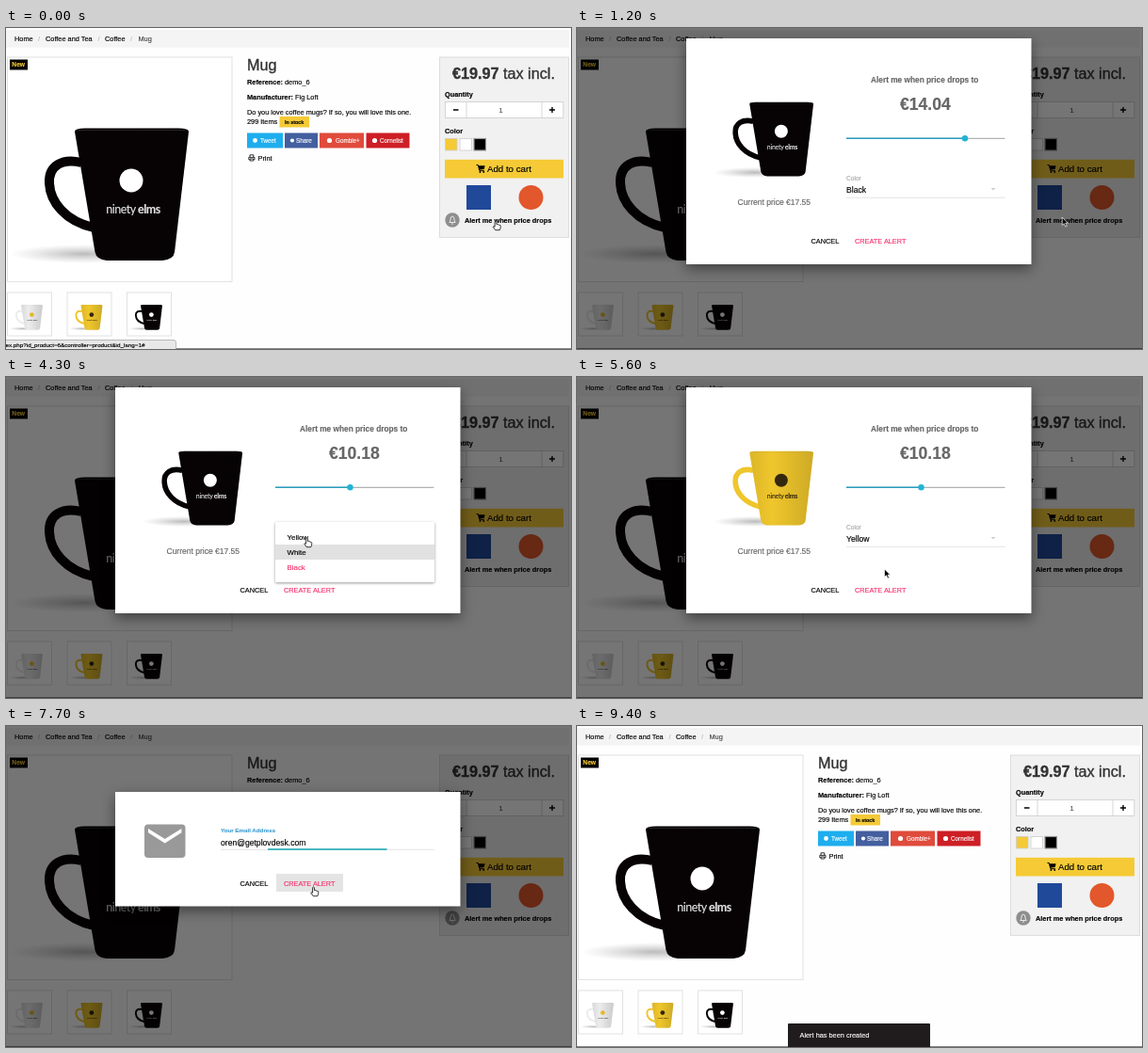
An HTML page for the animation above (9500 ms loop, 600 by 341 pixels).

```html
<!DOCTYPE html>
<html lang="en">
<head>
<meta charset="utf-8">
<title>Price alert</title>
<style>
  html, body { margin: 0; width: 100%; height: 100%; overflow: hidden; background: #fff; }
  svg { display: block; width: 100vw; height: 100vh; }
  text {
    font: 7.35px "Liberation Sans", Arial, sans-serif; white-space: pre;
    fill: currentColor; stroke: currentColor; stroke-width: .15;
  }
  .b { font-weight: bold; }
  .h { font-size: 16.2px; color: #333; stroke-width: .35; }
  .share text { font-size: 6.3px; color: #fff; }
  .share rect { y: 111.5px; height: 16px; }
  .share circle { fill: #fff; }
  .frame { fill: #fff; stroke: #e2e2e2; }
  .field { fill: #fff; stroke: #ccc; stroke-width: .8; }
  .big { font-size: 8.6px; }
  .grey { color: #666; }
  .pink { color: #f7316f; }
  .item { font-size: 7.9px; }
  .brand { font: 12.5px Lato, sans-serif; letter-spacing: -.5px; text-anchor: middle; color: var(--ink); }
  .black { --cup: #070304; --mark: #fff; --ink: #e4e4e4; }
  .yellow { --cup: #efc62c; --mark: #33270f; --ink: #33270f; }
  .white { --cup: #ececec; --mark: #e3b92a; --ink: #444; }
  .paper { fill: #fff; filter: drop-shadow(0 5px 7px rgba(0,0,0,.45)); }
</style>
</head>
<body>
<svg viewBox="0 0 600 341">
  <defs>
    <radialGradient id="ground">
      <stop offset="0" stop-color="#777" stop-opacity=".5"/>
      <stop offset="1" stop-color="#999" stop-opacity="0"/>
    </radialGradient>
    <linearGradient id="shade">
      <stop offset="0" stop-opacity=".08"/>
      <stop offset=".35" stop-opacity="0"/>
      <stop offset="1" stop-opacity=".14"/>
    </linearGradient>
    <path id="cup" d="M73 110Q73 106.500 84 106.500H183Q194 106.500 194 110L179 238Q178 246 166 247H107Q96 246 94.500 238Z"/>
    <g id="mug">
      <ellipse cx="82" cy="240" rx="78" ry="10" fill="url(#ground)"/>
      <path d="M80 143C60 138 45 146 46 165C47 185 63 205 93 212" fill="none" stroke="var(--cup)" stroke-width="10"/>
      <use href="#cup" fill="var(--cup)"/>
      <use href="#cup" fill="url(#shade)"/>
      <path d="M77 108.500H190" stroke="#888" stroke-opacity=".3" stroke-width=".8"/>
      <circle cx="133" cy="162" r="12.500" fill="var(--mark)"/>
      <text class="brand" x="135" y="197">ninety <tspan class="b">elms</tspan></text>
    </g>
  </defs>

  <rect width="600" height="341" fill="#fefefe"/>
  <rect y="2" width="598" height="18.5" fill="#f4f4f4"/>
  <text x="9" y="13.7">Home</text>
  <text x="42" y="13.7">Coffee and Tea</text>
  <text x="105" y="13.7">Coffee</text>
  <text x="140.5" y="13.7" color="#444">Mug</text>
  <g color="#bbb"><text x="34" y="13.7">/</text><text x="97.5" y="13.7">/</text><text x="132" y="13.7">/</text></g>

  <rect class="frame" x="1.5" y="31" width="238.5" height="238.5"/>
  <use href="#mug" class="black"/>
  <rect x="4" y="33.5" width="19" height="11"/>
  <text class="b" x="6.3" y="41.4" style="font-size:6.7px" color="#f5ca36">New</text>
  <g>
    <rect class="frame" x="1.5" y="281" width="47" height="46"/>
    <rect class="frame" x="65" y="281" width="47" height="46"/>
    <rect class="frame" x="128.5" y="281" width="47" height="46"/>
    <use href="#mug" class="white" transform="translate(2.1 273.8) scale(.19)"/>
    <use href="#mug" class="yellow" transform="translate(65.6 273.8) scale(.19)"/>
    <use href="#mug" class="black" transform="translate(129.1 273.8) scale(.19)"/>
  </g>

  <text class="h" x="256" y="45">Mug</text>
  <text x="256" y="60.3"><tspan class="b">Reference:</tspan> demo_6</text>
  <text x="256" y="76"><tspan class="b">Manufacturer:</tspan> Fig Loft</text>
  <text x="256" y="91.5">Do you love coffee mugs? If so, you will love this one.</text>
  <text x="256" y="102">299 Items</text>
  <rect x="290.5" y="94" width="31.5" height="11.5" fill="#f5ca36"/>
  <text class="b" x="296" y="101.8" style="font-size:5.4px">In stock</text>
  <g class="share">
    <rect x="256" width="38" fill="#1eaeee"/>
    <circle cx="264.5" cy="119.5" r="2.4"/><text x="270" y="121.8">Tweet</text>
    <rect x="296" width="35" fill="#435f9f"/>
    <circle cx="304" cy="119.5" r="2.1"/><text x="308" y="121.8">Share</text>
    <rect x="333" width="47" fill="#e04b3c"/>
    <circle cx="343.5" cy="119.5" r="2.6"/><text x="350" y="121.8">Gomble+</text>
    <rect x="382.5" width="46" fill="#cd1f25"/>
    <circle cx="391.5" cy="119.5" r="2.6"/><text x="397" y="121.8">Cornelist</text>
  </g>
  <path d="M259 137.2v-2.4h3.8v2.4M258.6 139.8h-.8v-2.4h6.2v2.4h-.8M259 139h3.8v2H259z" fill="none" stroke="#000" stroke-width=".8"/>
  <text x="267.5" y="141">Print</text>

  <rect x="460.5" y="31" width="137" height="191.5" fill="#f1f1f1" stroke="#ddd"/>
  <text class="h" x="474" y="54"><tspan class="b">€19.97</tspan> tax incl.</text>
  <text class="b" x="466" y="73">Quantity</text>
  <rect class="field" x="466.4" y="78.4" width="125.4" height="17"/>
  <path d="M489 78.4v17M569 78.4v17" stroke="#ccc" stroke-width=".8"/>
  <path d="M475 87h5.5M577 87h6M580 84v6" stroke="#000" stroke-width="1.4"/>
  <text x="523.5" y="89.6" color="#555">1</text>
  <text class="b" x="466" y="111.5">Color</text>
  <rect class="field" x="466.5" y="117.5" width="12.5" height="12.5" style="fill:#f5ca36"/>
  <rect class="field" x="482" y="117.5" width="12.5" height="12.5"/>
  <rect class="field" x="497" y="117.5" width="12.5" height="12.5" style="fill:#000;stroke:#999;stroke-width:1.2"/>
  <rect x="466" y="139.8" width="126" height="19.7" fill="#f5ca36"/>
  <path d="M499.5 145.5h1.8l1.6 6.2h5" fill="none" stroke="#000"/>
  <path d="M501.6 146.3h7l-.8 3.8-5.2.7z"/>
  <circle cx="503.4" cy="153" r=".9"/><circle cx="507.3" cy="153" r=".9"/>
  <text x="511" y="152.8" style="font-size:9.7px">Add to cart</text>
  <rect x="489" y="167" width="26" height="26" fill="#20499a"/>
  <circle cx="557.5" cy="180" r="13" fill="#e2572b"/>
  <circle cx="474" cy="204" r="7.7" fill="#8e8e8e"/>
  <path d="M470.8 206.5q1.2-1 1.2-3.3q0-3 2-3.2q2 .2 2 3.2q0 2.3 1.2 3.3zM473 208h2" fill="none" stroke="#fff" stroke-width=".8"/>
  <text class="b" id="link" x="487" y="206.8">Alert me when price drops</text>
  <rect y="340" width="600" height="1" fill="#888"/>

  <rect id="veil" width="600" height="341"/>

  <g id="priceDialog">
    <rect class="paper" x="116" y="11" width="366.5" height="240"/>
    <use href="#mug" id="sample" transform="translate(142.4 19.1) scale(.56)"/>
    <text class="grey" x="170.5" y="188" style="font-size:8.5px">Current price €17.55</text>
    <text class="b grey" x="312" y="57.7" style="font-size:8.3px">Alert me when price drops to</text>
    <text class="b grey" id="price" x="343" y="86.5" style="font-size:17.6px"></text>
    <path d="M286 117.3H454.5" stroke="#b0b4b4" stroke-width="1.3"/>
    <path id="track" stroke="#2a9fbf" stroke-width="1.4"/>
    <circle id="thumb" cy="117.3" fill="#22b3d6"/>
    <text x="286" y="162" style="font-size:6.6px" color="#aaa">Color</text>
    <text class="big" id="color" x="286" y="174.6"></text>
    <path d="M439.5 170h5l-2.5 2.5z" fill="#ccc"/>
    <path d="M286 180.3H454.5" stroke="#ddd" stroke-width=".8"/>
    <rect id="hover1" x="287" y="216.5" width="71" height="19" fill="#e4e4e4"/>
    <text x="248.5" y="229.2">CANCEL</text>
    <text class="pink" x="295" y="229.2">CREATE ALERT</text>
    <g id="menu">
      <rect x="286" y="154" width="169" height="64" rx="1" fill="#fff" style="filter:drop-shadow(0 1px 1.5px rgba(0,0,0,.4))"/>
      <rect id="row" x="286" width="169" height="16" fill="#e1e1e1"/>
      <text class="item" x="298.5" y="172.7">Yellow</text>
      <text class="item" x="298.5" y="188.6">White</text>
      <text class="item pink" x="298.5" y="204.5">Black</text>
    </g>
  </g>

  <g id="mailDialog">
    <rect class="paper" x="116" y="70" width="366.5" height="121.5"/>
    <rect x="147" y="104.5" width="43.5" height="35.5" rx="4" fill="#999"/>
    <path d="M151 109V113.3L168.7 124.5L186.4 113.3V109L168.7 120Z" fill="#fff"/>
    <text class="b" x="228" y="113.3" style="font-size:6.2px" color="#3f9fd2">Your Email Address</text>
    <text class="big" id="mail" x="228" y="127.3"></text>
    <path d="M228 131.3H454.5" stroke="#ddd" stroke-width=".8"/>
    <rect id="focus" y="130.2" height="1.6" fill="#22a9b5"/>
    <rect id="hover2" x="287" y="157" width="71" height="19" fill="#e4e4e4"/>
    <text x="248.5" y="169.5">CANCEL</text>
    <text class="pink" x="295" y="169.5">CREATE ALERT</text>
  </g>

  <g id="snack">
    <rect x="224" y="316" width="151" height="27" rx="1" fill="#201b1d"/>
    <text x="236.5" y="331.3" color="#fff">Alert has been created</text>
  </g>
  <g id="status">
    <path d="M-1 331.5H178Q180.5 331.5 180.5 334V342H-1Z" fill="#e8e8e8" stroke="#aaa" stroke-width=".8"/>
    <text x="-.5" y="338.5" style="font-size:6.25px">ex.php?id_product=6&amp;controller=product&amp;id_lang=1#</text>
  </g>
  <g id="cursor" stroke-linejoin="round">
    <path id="arrow" d="M0 0V8.5L2 6.7L3.5 10L5 9.3L3.5 6.2H6.2Z" stroke="#fff" stroke-width=".7"/>
    <path id="hand" d="M-.9 .6Q0-.5 .9 .6V3.5Q2 3 2.5 3.9Q3.6 3.5 4 4.5Q5.3 4.3 5.3 5.5Q5.3 7.5 4.3 9.7H-.3L-2.7 6.3Q-2.7 5-.9 6.2Z" fill="#fff" stroke="#000" stroke-width=".8"/>
  </g>
</svg>
<script>
const LOOP = 9500, MAIL = 'oren@getplovdesk.com';
const PATH = [ // time, x, y of the pointer
  [0, 520, 205], [1100, 520, 205], [1900, 410.5, 114], [2050, 410.5, 114],
  [2400, 379, 114], [2850, 364, 114], [3100, 364, 114], [3650, 322, 171],
  [3850, 322, 171], [4100, 322, 184], [4300, 319.5, 171], [4950, 319.5, 171],
  [5600, 326.5, 204], [5850, 327, 222], [7200, 327, 222], [7500, 326.5, 171],
  [8050, 326.5, 171], [8450, 345, 360]
];
const $ = id => document.getElementById(id);
const set = (id, attrs) => { for (const k in attrs) $(id).setAttribute(k, attrs[k]); };
const show = (id, on) => { $(id).style.display = on ? '' : 'none'; };
const ramp = (t, start, length) => Math.min(1, Math.max(0, (t - start) / length));
const easeOut = p => 1 - (1 - p) ** 4;
const within = (t, ...spans) => spans.some(([a, b]) => t >= a && t < b);

function pointer(t) {
  const i = PATH.findIndex(k => k[0] > t);
  if (i < 0) return PATH[PATH.length - 1].slice(1);
  const [t0, x0, y0] = PATH[i - 1], [t1, x1, y1] = PATH[i];
  const p = ramp(t, t0, t1 - t0), s = p * p * (3 - 2 * p);
  return [x0 + (x1 - x0) * s, y0 + (y1 - y0) * s];
}

function draw(t) {
  const [x, y] = pointer(t);
  set('cursor', { transform: `translate(${x} ${y})` });
  const pointing = within(t, [0, 330], [1850, 3150], [3500, 5050], [5700, 6150], [7350, 7850]);
  show('hand', pointing);
  show('arrow', !pointing);
  show('status', t < 900);
  $('link').style.textDecoration = within(t, [100, 1150]) ? 'underline' : 'none';

  const enter = easeOut(ramp(t, 340, 450));
  set('veil', { opacity: .54 * enter * (1 - ramp(t, 7850, 350)) });

  show('priceDialog', within(t, [340, 6150]));
  set('priceDialog', { transform: `translate(0 ${-35 * (1 - enter)})`, opacity: ramp(t, 340, 120) });
  const knob = t < 2050 ? 412 : t < 2900 ? x + 1.5 : 365.5;
  const percent = Math.round(20 + 80 * (knob - 286) / 168);
  $('price').textContent = '€' + (17.545 * percent / 100).toFixed(2);
  set('track', { d: `M286 117.3H${knob}` });
  set('thumb', { cx: knob, r: within(t, [2050, 2950]) ? 4.7 : 3.2 });
  const picked = t >= 5100;
  set('sample', { class: picked ? 'yellow' : 'black' });
  $('color').textContent = picked ? 'Yellow' : 'Black';
  show('menu', within(t, [3800, 5200]));
  set('menu', { opacity: ramp(t, 3800, 200) * (1 - ramp(t, 5000, 200)) });
  set('row', { y: t < 4050 ? 194 : t < 4350 ? 178 : 162 });
  show('hover1', within(t, [5700, 6150]));

  show('mailDialog', within(t, [6150, 7900]));
  $('mail').textContent = MAIL.slice(0, Math.floor(MAIL.length * ramp(t, 6500, 700)));
  const line = 226.5 * easeOut(ramp(t, 6200, 450)) * (1 - easeOut(ramp(t, 7640, 450)));
  set('focus', { x: 341.3 - line / 2, width: line });
  show('hover2', within(t, [7350, 7900]));

  set('snack', { transform: `translate(0 ${27 * (1 - easeOut(ramp(t, 8200, 400)))})` });
}

function tick() {
  draw(performance.now() % LOOP);
  requestAnimationFrame(tick);
}
tick();
</script>
</body>
</html>
```
